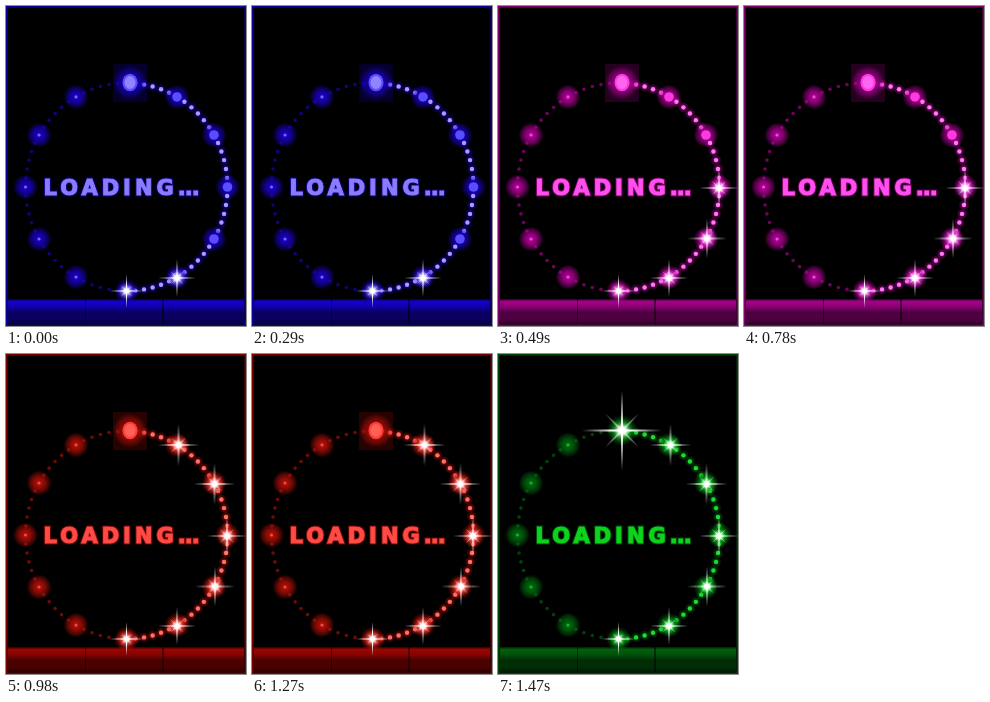
An HTML page that plays this animation: 240 by 320 pixels, repeating every 1960 ms.

```html
<!DOCTYPE html>
<html lang="en">
<head>
<meta charset="utf-8">
<title>Loading</title>
<style>
html, body { margin: 0; width: 100%; height: 100%; overflow: hidden; background: #000; }
svg { display: block; width: 100vw; height: 100vh; animation: tint 1960ms step-end infinite; }
@keyframes tint {
  0%, 100% { --text: #8a7cff; --dot: #a99cff; --core: #5a4cff; --glow: #1c00d4; --edge: #10009a; --bar: #1400cc; --low: #05003c; }
  25% { --text: #ff50ee; --dot: #ff7af2; --core: #ff38e4; --glow: #bc00a0; --edge: #80006c; --bar: #a4008a; --low: #300028; }
  50% { --text: #ff4a46; --dot: #ff7068; --core: #ff3c36; --glow: #bc1008; --edge: #780000; --bar: #9c0400; --low: #2e0000; }
  75% { --text: #0cd41c; --dot: #1cdc30; --core: #0cc41c; --glow: #007010; --edge: #004406; --bar: #00600c; --low: #001c02; }
}
.on1 { animation: on1 1960ms step-end infinite; }
.on2 { animation: on2 1960ms step-end infinite; }
.on3 { animation: on3 1960ms step-end infinite; }
.off3 { animation: off3 1960ms step-end infinite; }
@keyframes on1 { 0%, 100% { opacity: 0 } 25% { opacity: 1 } }
@keyframes on2 { 0%, 100% { opacity: 0 } 50% { opacity: 1 } }
@keyframes on3 { 0%, 100% { opacity: 0 } 75% { opacity: 1 } }
@keyframes off3 { 0%, 100% { opacity: 1 } 75% { opacity: 0 } }
.dot { fill: var(--dot); }
.core { fill: var(--core); }
.dim { fill: var(--glow); }
.glow { stop-color: var(--glow); }
.light { stop-color: var(--dot); }
.bar { stop-color: var(--bar); }
.low { stop-color: var(--low); }
.edge { fill: none; stroke: var(--edge); stroke-width: 1.5; }
text { font: bold 21px "DejaVu Sans", sans-serif; letter-spacing: 4px; fill: var(--text); stroke: var(--text); stroke-width: 1px; }
.points { letter-spacing: -1px; }
text.halo { fill: none; stroke: var(--glow); stroke-width: 3px; opacity: .6; }
</style>
</head>
<body>
<svg viewBox="0 0 240 320" preserveAspectRatio="none">
  <defs>
    <radialGradient id="orb">
      <stop class="glow" offset="0"/>
      <stop class="glow" offset=".4" stop-opacity=".75"/>
      <stop class="glow" offset=".75" stop-opacity=".38"/>
      <stop class="glow" offset="1" stop-opacity="0"/>
    </radialGradient>
    <radialGradient id="flare">
      <stop offset="0" stop-color="#fff"/>
      <stop offset=".25" stop-color="#fff" stop-opacity=".9"/>
      <stop class="light" offset=".5" stop-opacity=".6"/>
      <stop class="glow" offset="1" stop-opacity="0"/>
    </radialGradient>
    <linearGradient id="panel" x2="0" y2="1">
      <stop class="low" offset="0"/>
      <stop class="bar" offset=".1"/>
      <stop class="bar" offset=".3" stop-opacity=".85"/>
      <stop class="bar" offset=".55" stop-opacity=".45"/>
      <stop class="low" offset="1"/>
    </linearGradient>
  </defs>
  <rect width="240" height="320"/>
  <rect class="edge" x=".75" y=".75" width="238.5" height="318.5"/>
  <g id="panels"></g>
  <g id="ring"></g>
  <text class="halo" x="37.5" y="188.5">LOADING<tspan class="points">...</tspan></text>
  <text x="37.5" y="188.5">LOADING<tspan class="points">...</tspan></text>
  <g id="stars"></g>
</svg>
<script>
const get = id => document.getElementById(id);

function add(parent, name, attrs) {
  const node = document.createElementNS("http://www.w3.org/2000/svg", name);
  for (const key in attrs) node.setAttribute(key, attrs[key]);
  return parent.appendChild(node);
}

// Degrees run clockwise from the top of the ring.
function onRing(degrees) {
  const a = degrees * Math.PI / 180;
  return { cx: 120.5 + 101 * Math.sin(a), cy: 181 - 104 * Math.cos(a) };
}

const ring = get("ring");
for (let d = 5; d < 360; d += 5) {
  const right = d < 180;
  const spot = onRing(d);
  if (d % 30) {
    if (right) add(ring, "circle", { ...spot, fill: "url(#orb)", r: 5.5, opacity: .7 });
    add(ring, "circle", { ...spot, class: right ? "dot" : "dim", r: right ? 2.2 : 1.8, opacity: right ? 1 : .6 });
  } else {
    add(ring, "circle", { ...spot, fill: "url(#orb)", r: 12.5 });
    add(ring, "circle", { ...spot, class: right ? "core" : "dot", r: right ? 4.8 : 1.6, opacity: right ? 1 : .65 });
  }
}

const crown = { cx: 124, cy: 76.5 };
const lamp = add(ring, "g", { class: "off3" });
add(lamp, "rect", { class: "dim", x: 107, y: 58, width: 34, height: 38, opacity: .2 });
add(lamp, "circle", { ...crown, fill: "url(#orb)", r: 17 });
add(lamp, "ellipse", { ...crown, class: "core", rx: 7.5, ry: 8.7 });
add(lamp, "ellipse", { ...crown, class: "dot", rx: 5.5, ry: 6.5, opacity: .7 });

// Four tapering rays, drawn as one thin star.
function rays(length, waist) {
  const points = [];
  for (let i = 0; i < 8; i++) {
    const r = i % 2 ? waist : length, a = i * Math.PI / 4;
    points.push((r * Math.sin(a)).toFixed(2) + "," + (-r * Math.cos(a)).toFixed(2));
  }
  return points.join(" ");
}

function star(x, y, size, step) {
  const g = add(get("stars"), "g", { class: "on" + step, transform: `translate(${x} ${y})` });
  const waist = .6 + size * .025;
  add(g, "circle", { r: 5 + size * .27, fill: "url(#flare)" });
  add(g, "polygon", { points: rays(size, waist), fill: "#fff" });
  add(g, "polygon", { points: rays(size * .7 - 4, waist), fill: "#fff", opacity: .6, transform: "rotate(45)" });
}

star(120.5, 285, 17, 0);
star(171, 272, 19, 0);
star(209, 232.5, 20, 1);
star(221, 182, 20, 1);
star(208.5, 130, 21, 2);
star(172.5, 91, 21, 2);
star(124, 76.5, 40, 3);

for (const x of [2, 79.5, 157.5])
  add(get("panels"), "rect", { x, y: 293, width: x > 100 ? 80.5 : 77, height: 25, fill: "url(#panel)" });
</script>
</body>
</html>
```
